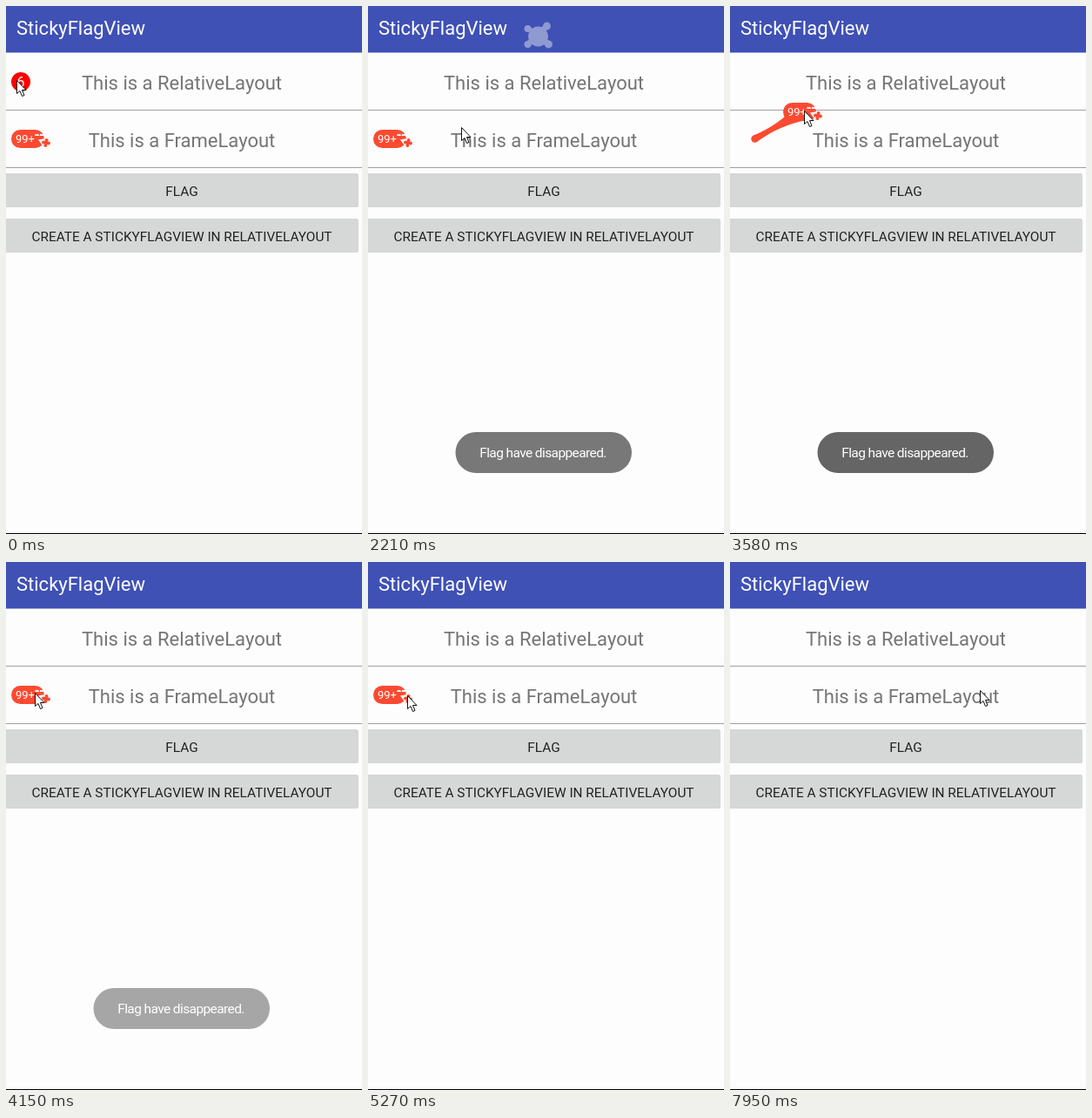
Recreate the animation shown at these times as an HTML page with a canvas. Size 409x606 px, loop 8 s.

```html
<!DOCTYPE html>
<html lang="en">
<head>
<meta charset="utf-8">
<title>StickyFlagView</title>
<style>
  html, body { margin: 0; width: 100%; height: 100%; overflow: hidden; background: #fdfdfd; }
  canvas { display: block; width: 409px; height: 606px; }
</style>
</head>
<body>
<canvas id="stage"></canvas>
<script>
const W = 409, H = 606, LOOP = 8000;
const STEP = 137, PHASE = 4;            // the screen refreshes in steps
const LAG = 74, BREAK = 98;             // flags trail the pointer, bands snap
const ROUND_POP = 1920, PILL_POP = 6790;
const WHITE = '#fdfdfd', RED = '#fb4a31';

const canvas = document.getElementById('stage');
const ctx = canvas.getContext('2d');
const dpr = window.devicePixelRatio || 1;
canvas.width = W * dpr;
canvas.height = H * dpr;

// Pointer strokes: start, end, x, y; the pointer rests in between
const home = [12, 85];
const strokes = [
  [270, 390, 76, 42], [390, 510, ...home], [780, 1768, 192, 38],
  [1920, 2196, 107, 139], [2196, 2620, 20, 150], [2620, 2900, 30, 151],
  [3060, 3480, 85, 120], [3600, 4100, 33, 150],
  [4150, 4700, 93, 112], [4700, 5200, 45, 153], [5290, 6320, 93, 240],
  [6800, 7080, 111, 277], [7080, 7800, 171, 237], [7800, 7950, 287, 147]
];

// Times at which each flag is grabbed and let go
const roundDrags = [[270, ROUND_POP]];
const pillDrags = [[3060, 4110], [4120, 5210], [5290, PILL_POP]];

const clamp = (v, a = 0, b = 1) => Math.min(b, Math.max(a, v));
const mix = (a, b, k) => a + (b - a) * k;
const ease = k => k * k * (3 - 2 * k);
const snap = t => Math.max(0, PHASE + Math.floor((t - PHASE) / STEP) * STEP);

function pointer(t) {
  let [x, y] = home;
  for (const [a, b, tx, ty] of strokes) {
    const k = ease(clamp((t - a) / (b - a)));
    x = mix(x, tx, k);
    y = mix(y, ty, k);
  }
  return [x, y];
}

function shift(t, drags) {
  const drag = drags.find(([a, b]) => t >= a && t < b);
  if (!drag) return [0, 0];
  const [gx, gy] = pointer(drag[0]);
  const [x, y] = pointer(Math.max(t - LAG, drag[0]));
  return [x - gx, y - gy];
}

function text(str, x, y, size, color, align = 'center') {
  ctx.font = `${size}px Roboto, "Noto Sans", sans-serif`;
  ctx.textAlign = align;
  ctx.fillStyle = color;
  ctx.fillText(str, x, y);
}

function box(x, y, w, h, r, color) {
  ctx.fillStyle = color;
  ctx.beginPath();
  ctx.roundRect(x, y, w, h, r);
  ctx.fill();
}

function disc(x, y, r, color) {
  ctx.fillStyle = color;
  ctx.beginPath();
  ctx.arc(x, y, r, 0, Math.PI * 2);
  ctx.fill();
}

function poly(points, color) {
  ctx.fillStyle = color;
  ctx.beginPath();
  points.forEach(([x, y]) => ctx.lineTo(x, y));
  ctx.closePath();
  ctx.fill();
}

function button(label, y) {
  box(-3, y, 408, 39, 2.5, '#d6d7d7');
  text(label, 202, y + 25.5, 15.4, '#222');
}

function screen() {
  box(0, 0, W, H, 0, WHITE);
  box(0, 0, W, 53.5, 0, '#3f51b5');
  text('StickyFlagView', 12, 33, 22, '#fff', 'left');
  ['RelativeLayout', 'FrameLayout'].forEach((name, i) => {
    text('This is a ' + name, 202, 95.5 + 66 * i, 22, '#757575');
    box(0, 119 + 66 * i, W, 1, 0, '#a0a0a0');
  });
  button('FLAG', 192);
  button('CREATE A STICKYFLAGVIEW IN RELATIVELAYOUT', 244);
  box(0, 605, W, 1, 0, '#000');
}

// Elastic band from the resting place to the dragged flag
function band(x, y, dx, dy, r, color) {
  const d = Math.hypot(dx, dy);
  if (d < 1 || d > BREAK) return;
  const small = Math.max(3.5, r - d / 10);
  const nx = -dy / d, ny = dx / d;
  const ex = x + dx, ey = y + dy, mx = x + dx / 2, my = y + dy / 2;
  disc(x, y, small, color);
  ctx.beginPath();
  ctx.moveTo(x + nx * small, y + ny * small);
  ctx.quadraticCurveTo(mx, my, ex + nx * r, ey + ny * r);
  ctx.lineTo(ex - nx * r, ey - ny * r);
  ctx.quadraticCurveTo(mx, my, x - nx * small, y - ny * small);
  ctx.fill();
}

function roundFlag(dx, dy) {
  band(17, 87, dx, dy, 11, '#f00');
  disc(17 + dx, 87 + dy, 11, '#f00');
  text('6', 17 + dx, 92.7 + dy, 16, '#fff');
}

function pillFlag(dx, dy) {
  band(28.5, 152.5, dx, dy, 10.5, RED);
  ctx.save();
  ctx.translate(dx, dy);
  box(6, 142, 38, 21, 10.5, RED);
  text('99+', 11, 157, 13, '#fff', 'left');
  for (const x of [35.5, 41]) {
    poly([[x - 2.5, 149], [x - 1.5, 146.5], [x, 147.5], [x + 1.5, 146.5], [x + 2.5, 149]], WHITE);
  }
  poly([[37, 153.5], [45, 152], [45, 161], [41, 159]], WHITE);
  disc(46, 157, 2.4, RED);
  for (let i = 0; i < 4; i++) {
    const a = 0.2 + i * Math.PI / 2;
    disc(46 + 3 * Math.cos(a), 157 + 3 * Math.sin(a), 2, RED);
  }
  ctx.restore();
}

// Cloud with four limbs that swells and fades
function puff(x, y, age) {
  const k = age / 480;
  if (k < 0 || k > 1) return;
  const size = 0.85 + 0.25 * k;
  ctx.save();
  ctx.translate(x, y);
  ctx.scale(size, size);
  ctx.globalAlpha = 0.85 - 0.44 * k;
  ctx.fillStyle = '#c8cce6';
  ctx.beginPath();
  for (const [lx, ly, r] of [[0, 2, 11.5], [-12, -7, 4], [10, -10, 4.5], [-12, 11, 4], [12, 11, 4.5]]) {
    const a = Math.atan2(ly, lx);
    ctx.moveTo(lx + r, ly);
    ctx.arc(lx, ly, r, 0, Math.PI * 2);
    ctx.moveTo(0, 0);
    ctx.arc(lx, ly, r, a - 1.6, a + 1.6);
  }
  ctx.fill();
  ctx.restore();
}

function toast(t) {
  const a = Math.min(clamp((t - 1970) / 258), clamp((4345 - t) / 405));
  if (!a) return;
  ctx.save();
  ctx.globalAlpha = a;
  box(100.5, 489, 202.5, 47, 23.5, '#656565');
  ctx.globalAlpha = 1;
  ctx.letterSpacing = '-0.6px';
  text('Flag have disappeared.', 201, 518, 15.5, '#fff');
  ctx.restore();
}

function cursor([x, y]) {
  ctx.save();
  ctx.translate(Math.round(x) + 0.5, Math.round(y) + 0.5);
  poly([[0, 0], [0, 15], [3.5, 12], [6, 18], [8.5, 17], [6, 11], [10.5, 11]], '#fff');
  ctx.strokeStyle = '#111';
  ctx.lineWidth = 1;
  ctx.stroke();
  ctx.restore();
}

function draw(now) {
  const t = snap(now % LOOP);
  ctx.setTransform(dpr, 0, 0, dpr, 0, 0);
  screen();
  if (t < ROUND_POP) roundFlag(...shift(t, roundDrags));
  if (t < PILL_POP) pillFlag(...shift(t, pillDrags));
  puff(195.5, 33, t - ROUND_POP);
  puff(82.5, 242, t - PILL_POP);
  toast(t);
  cursor(pointer(t));
  requestAnimationFrame(draw);
}
requestAnimationFrame(draw);
</script>
</body>
</html>
```
